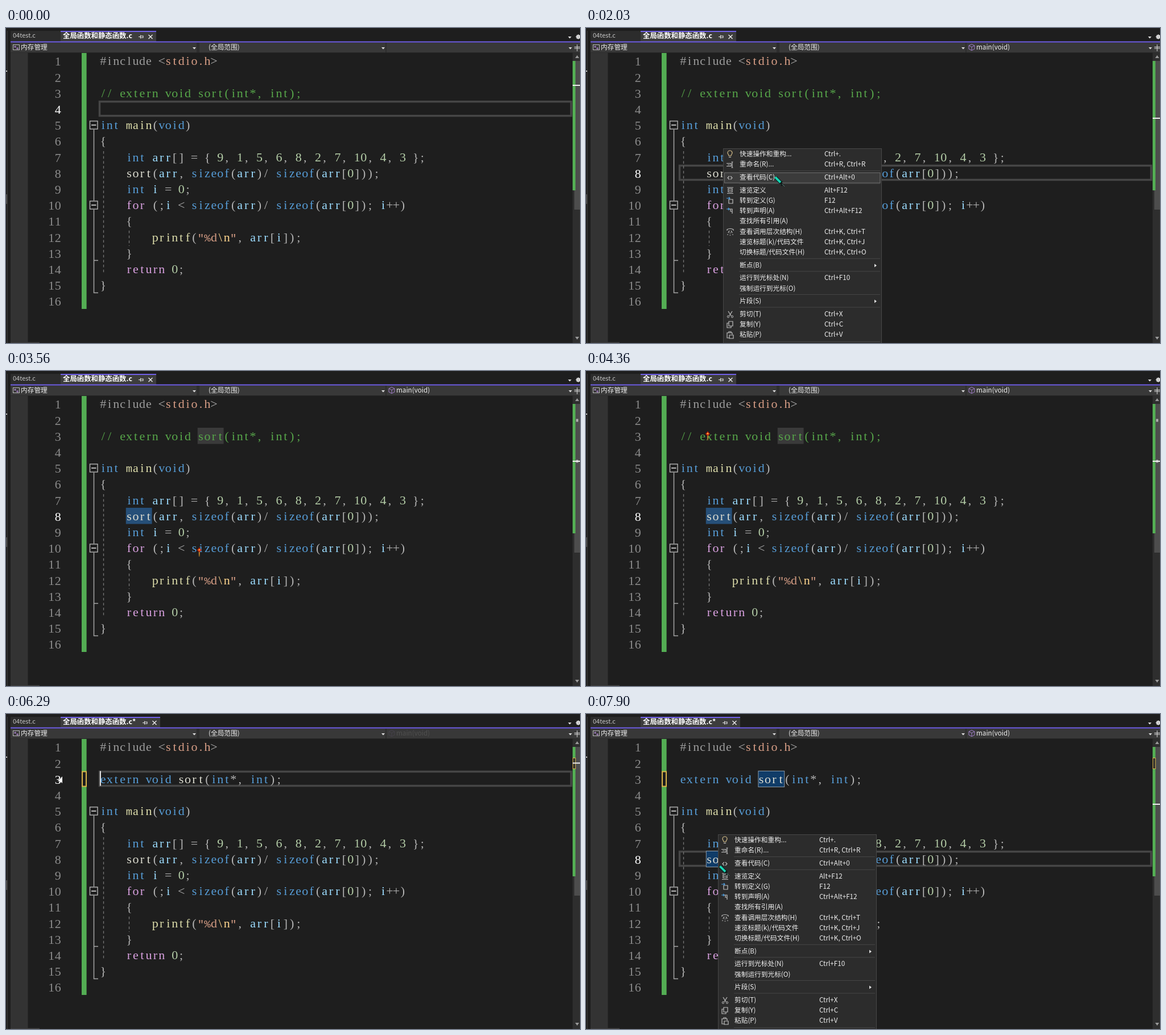
An HTML page for the animation above (8 s loop, 1009 by 555 pixels).

```html
<!DOCTYPE html>
<html lang="zh-CN">
<head>
<meta charset="utf-8">
<title>Code editor</title>
<style>
html, body { margin: 0; width: 100%; height: 100%; overflow: hidden; background: #1e1e1e; }
svg { display: block; width: 100vw; height: 100vh; }
text { white-space: pre; }
.code { font: 22px "Liberation Serif", serif; text-anchor: middle; font-variant-ligatures: none; }
.wide { font: 19px "Liberation Mono", monospace; }
.ui { font: 11.7px "Noto Sans CJK SC", "Noto Sans CJK", "Noto Sans", sans-serif; fill: #f0f0f0; }
.tab { font-size: 12.4px; font-weight: 700; fill: #fff; }
</style>
</head>
<body>
<svg id="stage" viewBox="0 0 1009 555"></svg>
<script>
const LOOP = 8000, LEFT = 165, CELL = 11.45, PITCH = 28.2;
const stage = document.getElementById('stage');

function el(tag, attrs, parent = stage, text) {
  const node = document.createElementNS('http://www.w3.org/2000/svg', tag);
  for (const k in attrs) node.setAttribute(k, attrs[k]);
  if (text !== undefined) node.textContent = text;
  parent.appendChild(node);
  return node;
}
const group = (parent = stage) => el('g', {}, parent);
const rect = (x, y, width, height, fill, parent, more) =>
  el('rect', { x, y, width, height, fill, ...more }, parent);
const line = (d, stroke, width = 1, parent, more) =>
  el('path', { d, stroke, 'stroke-width': width, fill: 'none', ...more }, parent);
const shape = (d, fill, parent) => el('path', { d, fill }, parent);
const label = (x, y, text, parent, cls = 'ui') => el('text', { x, y, class: cls }, parent, text);
const show = (node, on) => node.setAttribute('display', on ? 'inline' : 'none');
const move = (node, x, y) => node.setAttribute('transform', `translate(${x} ${y})`);
const colX = col => LEFT + col * CELL;
const rowY = row => 100 + (row - 3) * PITCH;
const baseY = row => 65.3 + (row - 1) * PITCH;
const markY = row => 100.5 + (row - 4) * 14.5;

// Code text on a fixed character grid
function tokenColor(s) {
  if (s.startsWith('//')) return '#57a64a';
  if (s[0] === '#') return '#9b9b9b';
  if (s === '\\n') return '#ffd68f';
  if (s === 'stdio.h' || /["%]/.test(s)) return '#d69d85';
  if (/^(int|void|sizeof|extern)$/.test(s)) return '#569cd6';
  if (/^(for|return)$/.test(s)) return '#d8a0df';
  if (/^(main|printf)$/.test(s)) return '#dcdcaa';
  if (/^(arr|i)$/.test(s)) return '#9cdcfe';
  if (s === 'sort') return '#dcdcd0';
  return /\d/.test(s) ? '#b5cea8' : '#b4b4b4';
}
function glyphs(text, col, y, fill, cls, parent) {
  if (!text) return;
  const x = [...text].map((c, i) => (colX(col + i + .5)).toFixed(2)).join(' ');
  el('text', { x, y, fill, class: cls }, parent, text);
}
function codeLine(text, row, parent) {
  const parts = /\/\/.*|#\w+|stdio\.h|\\n|%d|[a-zA-Z]+|\d+|[^\s\w]/g;
  for (const t of text.matchAll(parts)) {
    const fill = tokenColor(t[0]);
    for (const p of t[0].matchAll(/[m%"]|[^m%"]+/g)) {
      const wide = /[m%"]/.test(p[0]);
      glyphs(p[0], t.index + p.index, baseY(row), fill, wide ? 'code wide' : 'code', parent);
    }
  }
}

// Window frame
rect(0, 0, 1009, 555, '#1e1e1e');
line('M2.5 5V555', '#3a3a3a');
rect(0, 293, 2, 17, '#4a4a4a');
rect(0, 75, 2, 2, '#ccc');
rect(8, 5, 88, 19, '#2c2c2c');
label(12, 17, '04test.c').setAttribute('style', 'font-size:11px;fill:#c4c4c4');
const tab = rect(96, 5, 168, 19, '#3d3d3d');
const tabTop = rect(96, 5, 168, 2, '#7160e8');
const title = label(100, 18, '', stage, 'ui tab');
const tabTools = group();
line('M233 15.5h3M236.5 12.5v6M237 14h4v3h-4', '#ddd', 1.2, tabTools);
line('M250.5 12l7 7M257.5 12l-7 7', '#eee', 1.3, tabTools);
rect(8, 23.5, 1001, 2, '#7160e8');
rect(8, 26, 1001, 17.5, '#2d2d2d');
for (const x of [8, 340, 669]) {
  rect(x, 26, 327, 17, '#383838');
  shape(`M${x + 320} 34h6l-3 3.5z`, '#ddd');
}
shape('M988 15h6l-3 3.5z', '#ddd');
el('circle', { cx: 1006, cy: 15.5, r: 2.6, fill: 'none', stroke: '#ddd', 'stroke-width': 2 });
line('M1006 11v9M1001.5 15.5h9M1003 12.5l6 6M1009 12.5l-6 6', '#ddd', 1);
rect(12.5, 29.5, 11, 9, 'none', stage, { stroke: '#bbb' });
line('M14 33h4M16 31v4M18 36h4M20 34v4', '#b48ad8', 1);
label(26, 37.5, '内存管理');
label(356, 37.5, '(全局范围)');
const scope = group();
line('M678 28.5l5 2.5v6l-5 2.5l-5-2.5v-6zM673 31l5 2.5l5-2.5M678 33.5v6', '#a07fc8', 1, scope);
label(686, 37.5, 'main(void)', scope);

// Margins and scroll bar
rect(8, 43.5, 30.5, 510, '#333');
rect(8, 553.5, 51, 2, '#3e3e3e');
rect(133, 44, 8.6, 451, '#54ae54');
rect(996, 43.5, 13, 512, '#2e2e2e');
rect(999, 58, 10, 262, '#4d4d4d');
rect(996, 58, 5, 228, '#54ae54');
rect(996, 26, 13, 17, '#3a3a3a');
line('M999 33.5h10M999 36h10M1004 29v12', '#ddd', 1);
shape('M1000.5 53h7l-3.5-5zM1000.5 544h7l-3.5 5z', '#999');
const edits = group();
rect(134, 101.5, 7, 26, '#1e1e1e', edits, { stroke: '#d8b44a', 'stroke-width': 2 });
rect(996.5, 77.5, 4.5, 19, '#2e2e2e', edits, { stroke: '#d8b44a' });
const matches = group();
rect(1002, 84.5, 4, 5, '#aaa', matches);
rect(1002, 156.5, 4, 5, '#aaa', matches);
const mark = rect(996, 0, 13, 2, '#eee');

// Line highlight, selections
const lineBox = rect(164.5, 1.5, 829, 25, 'none', stage, { stroke: '#464646', 'stroke-width': 3.5 });
const selected = group();
rect(colX(15), rowY(3), 4 * CELL, 28.5, '#3a3a3a', selected);
rect(colX(4), rowY(8), 4 * CELL, 28.5, '#264f78', selected);
const refs = group();
for (const [col, row] of [[12, 3], [4, 8]])
  rect(colX(col) + .5, rowY(row) + .5, 4 * CELL, 28, '#103c68', refs, { stroke: '#8a9aa8' });
const drag = rect(LEFT, rowY(3), 0, 28.5, '#264f78');

// Outline and indent guides
for (const y of [164, 305]) {
  rect(147.5, y, 13.5, 14, 'none', stage, { stroke: '#b4b4b4', 'stroke-width': 1.4 });
  line(`M150 ${y + 7}h8.5`, '#ddd', 1.6);
}
line('M154.5 179V304M154.5 320V466.5H162M154.5 409.5H162', '#a5a5a5', 1.5);
line('M171.5 217V434M216.5 357V384', '#777', 1.3, stage, { 'stroke-dasharray': '4.5 4.2' });

const source = ['#include <stdio.h>', '', '', '', 'int main(void)', '{',
  '    int arr[] = { 9, 1, 5, 6, 8, 2, 7, 10, 4, 3 };',
  '    sort(arr, sizeof(arr)/ sizeof(arr[0]));',
  '    int i = 0;',
  '    for (;i < sizeof(arr)/ sizeof(arr[0]); i++)',
  '    {', '        printf("%d\\n", arr[i]);', '    }', '    return 0;', '}', ''];
const numbers = source.map((text, i) => {
  codeLine(text, i + 1, stage);
  const digits = String(i + 1), x = [...digits].map((d, k) => 91.3 - (digits.length - 1 - k) * CELL);
  return el('text', { x: x.join(' '), y: baseY(i + 1) + 1, class: 'code' }, stage, digits);
});
const commented = group(), declared = group();
codeLine('// extern void sort(int*, int);', 3, commented);
codeLine('extern void sort(int*, int);', 3, declared);
const caret = rect(0, rowY(3) + .5, 1.8, 26, '#f4f4f4');

// Context menu
const menu = group();
rect(.5, 212.5, 278, 360, '#2c2c2c', menu, { stroke: '#474747' });
const hover = rect(2.5, -8.5, 273.5, 18, '#3b3b3b', menu, { stroke: '#747474' });
const items = [
  [222, '快速操作和重构...', 'Ctrl+.'], [240, '重命名(R)...', 'Ctrl+R, Ctrl+R'],
  [263, '查看代码(C)', 'Ctrl+Alt+0'], [285.5, '速览定义', 'Alt+F12'],
  [304, '转到定义(G)', 'F12'], [322, '转到声明(A)', 'Ctrl+Alt+F12'],
  [340, '查找所有引用(A)', ''], [358.5, '查看调用层次结构(H)', 'Ctrl+K, Ctrl+T'],
  [377, '速览标题(k)/代码文件', 'Ctrl+K, Ctrl+J'], [395, '切换标题/代码文件(H)', 'Ctrl+K, Ctrl+O'],
  [417.5, '断点(B)', '>'], [440, '运行到光标处(N)', 'Ctrl+F10'],
  [458.5, '强制运行到光标(O)', ''], [480.5, '片段(S)', '>'],
  [503.5, '剪切(T)', 'Ctrl+X'], [521.5, '复制(Y)', 'Ctrl+C'], [540, '粘贴(P)', 'Ctrl+V']];
items.forEach(([y, name, key], i) => {
  label(29, y + 4.3, name, menu);
  if (key === '>') shape(`M266 ${y - 2}l4 3l-4 3z`, '#ddd', menu);
  else label(178, y + 4.3, key, menu);
  const next = items[i + 1];
  if (!next || next[0] - y > 21) line(`M28 ${next ? (y + next[0]) / 2 : 552.5}H276`, '#454545', 1, menu);
});
const icon = (d, color = '#c0c0c0') => line(d, color, 1.2, menu);
icon('M10 225c0-2-2-3-2-5a4 4 0 0 1 8 0c0 2-2 3-2 5z', '#d8c08a');
icon('M10 227.5h4');
icon('M6 238.5h8v5h-8M16 236v10M14.5 236h3M14.5 246h3M8 241h4');
icon('M11 261l-3 3l3 3M13 261l3 3l-3 3');
icon('M7 281h11M7 291.5h11M9 283v6h7v-6zM10 286h5');
icon('M10 302h7v7h-7z');
icon('M6 300h6M10 298l2 2l-2 2', '#4f9fe0');
icon('M11 319h5v8M13 319v4h3');
icon('M6 319h5M9 317l2 2l-2 2', '#4f9fe0');
icon('M7 357v-2c3-2 8-2 11 0v2M11 357l-2 4M14 357l2 4M7 364h2M11.5 361h2M16 364h2M11.5 365h2');
icon('M9 499l5 8M16 499l-5 8');
for (const x of [9, 16]) el('circle', { cx: x, cy: 508.5, r: 1.7, fill: 'none', stroke: '#c0c0c0' }, menu);
icon('M10 517h7v8h-7zM10 520h-3v8h7v-3');
icon('M11 546h-4v-9h9v3M10 537v-2h4v2M11 541h7v6h-7z');

// Pointers
const beam = group(), pen = group(), arrow = group();
line('M0 3V12', '#9a6a28', 2.2, beam, { opacity: .85 });
line('M0 4V9', '#d8a038', 1, beam);
shape('M0-4l1.5 2.5l2.5 2l-2.5 2.5l-1.5 1.5l-1.5-1.5l-2.5-2.5l2.5-2z', '#d22410', beam);
el('circle', { cx: 0, cy: .3, r: 1.2, fill: '#ffd23c' }, beam);
line('M2 2L12 12', '#0a2624', 6, pen);
line('M1.5 1.5L11.5 11.5', '#18d6b4', 3.8, pen);
line('M10 13.5L14 9.5M12 12L17.5 17.5M12 17l2-2', '#0b1716', 2, pen);
line('M14 14l4 4', '#7d9a96', 1, pen);
shape('M0 0V12L-2.5 9.5L-4.5 12.5L-6 11.5L-4.5 8.5H-8z', '#fff', arrow);

const path = [
  [60, 822, 512], [400, 500, 300], [860, 232, 190], [920, 262, 184], [1100, 273, 284], [1360, 241, 263],
  [1850, 241, 263], [1970, 300, 244], [2030, 331, 261], [2420, 328, 290], [2900, 328, 290], [3090, 328, 303],
  [3400, 328, 303], [3700, 350, 325], [4140, 250, 190], [4220, 246, 180], [4360, 214, 110], [4430, 214, 110],
  [4700, 205, 112], [5090, 205, 112], [5230, 202, 113], [5390, 202, 113], [5540, 110, 112], [5610, 99, 110],
  [6830, 99, 110], [7200, 165, 195], [7580, 234, 266], [LOOP, 234, 267]];
function pointerAt(t) {
  const i = path.findIndex(p => p[0] > t);
  if (i <= 0) return path[0].slice(1);
  const [a, b] = [path[i - 1], path[i]], k = (t - a[0]) / (b[0] - a[0]);
  return [a[1] + (b[1] - a[1]) * k, a[2] + (b[2] - a[2]) * k];
}
const within = (t, a, b) => t >= a && t < b;

function draw(t) {
  const [x, y] = pointerAt(t);
  const row = t < 1510 ? 4 : within(t, 4700, 7580) ? 3 : 8;
  const numberRow = within(t, 7580, 7660) ? 3 : row;
  const edited = t >= 6290;

  title.textContent = '全局函数和静态函数.c' + (edited ? '*' : '');
  for (const r of [tab, tabTop]) r.setAttribute('width', edited ? 175 : 168);
  move(tabTools, edited ? 7 : 0, 0);
  show(scope, row !== 4);
  scope.setAttribute('opacity', row === 3 ? .12 : 1);
  show(edits, edited);
  show(commented, !edited);
  show(declared, edited);

  numbers.forEach((n, i) => n.setAttribute('fill', i + 1 === numberRow ? '#fff' : '#8c8c8c'));
  mark.setAttribute('y', markY(row) - .5);
  move(lineBox, 0, rowY(row));
  show(lineBox, !within(t, 3470, 4700) && !within(t, 5390, 6290));
  show(selected, within(t, 3470, 4700));
  show(matches, within(t, 3470, 4700));
  show(refs, t >= 7660);

  const dragging = within(t, 5390, 6290);
  const col = Math.max(0, Math.min(3, Math.round((x - LEFT) / CELL)));
  show(drag, dragging);
  drag.setAttribute('x', colX(col));
  drag.setAttribute('width', (3 - col) * CELL);
  caret.setAttribute('x', colX(edited ? 0 : dragging ? col : 3));
  show(caret, within(t, 4700, 5230) || within(t, 5390, 5900) || within(t, 6290, 6830) || within(t, 7360, 7580));

  const left = t < 5000 ? 241 : 232;
  const open = within(t, 1590, 3400) || t >= 7740;
  const hot = open && x > left + 3 && items.find(it => Math.abs(it[0] - y) < 9.5);
  show(menu, open);
  move(menu, left, 0);
  show(hover, hot && t < 5000);
  if (hot) move(hover, 0, hot[0] + .5);

  const overMargin = within(t, 5580, 6890);
  show(pen, open);
  show(arrow, overMargin);
  show(beam, t >= 60 && !open && !overMargin);
  for (const p of [pen, arrow, beam]) move(p, x, y);
}

const start = performance.now();
function tick() {
  draw((performance.now() - start) % LOOP);
  requestAnimationFrame(tick);
}
tick();
</script>
</body>
</html>
```
